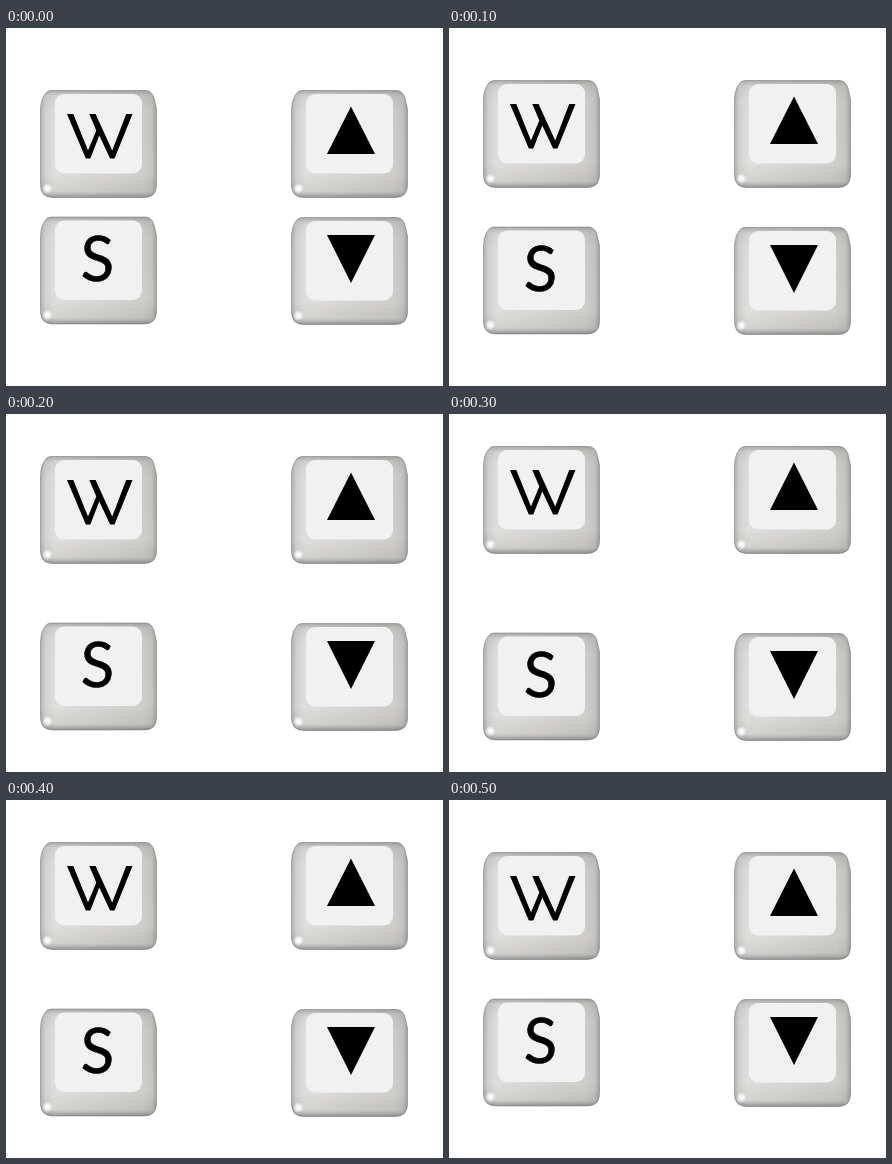
An HTML page without scripts that plays this animation: 437 px wide and 358 px high, repeating every 600 ms.

```html
<!DOCTYPE html>
<html lang="en">
<head>
<meta charset="utf-8">
<title>Arrow keys</title>
<style>
html, body { margin: 0; width: 100%; height: 100%; overflow: hidden; background: #fff; }
svg { display: block; width: 437px; height: 358px; }
.up { --step: -10px; }
.down { --step: 10px; }
.up, .down { animation: slide 600ms step-end infinite; }
@keyframes slide {
  0%, 100% { transform: translateY(0); }
  16.667%, 83.333% { transform: translateY(var(--step)); }
  33.333%, 66.667% { transform: translateY(calc(var(--step) * 2)); }
  50% { transform: translateY(calc(var(--step) * 3)); }
}
text { font: 61.5px Lato, sans-serif; text-anchor: middle; stroke: #000; stroke-width: .6px; }
</style>
</head>
<body>
<svg viewBox="0 0 437 358">
  <defs>
    <linearGradient id="side">
      <stop offset="0" stop-color="#aaa9a7"/>
      <stop offset=".04" stop-color="#cccbc9"/>
      <stop offset=".12" stop-color="#dbdad8"/>
      <stop offset=".5" stop-color="#d2d1cf"/>
      <stop offset=".88" stop-color="#c8c7c4"/>
      <stop offset=".96" stop-color="#bdbcb9"/>
      <stop offset="1" stop-color="#999896"/>
    </linearGradient>
    <linearGradient id="shade" x2="0" y2="1">
      <stop offset="0" stop-color="#777" stop-opacity=".5"/>
      <stop offset=".05" stop-color="#888" stop-opacity=".12"/>
      <stop offset=".2" stop-color="#fff" stop-opacity=".08"/>
      <stop offset=".78" stop-color="#fff" stop-opacity=".12"/>
      <stop offset=".94" stop-color="#888" stop-opacity=".1"/>
      <stop offset="1" stop-color="#555" stop-opacity=".55"/>
    </linearGradient>
    <radialGradient id="glint">
      <stop offset="0" stop-color="#fff"/>
      <stop offset=".4" stop-color="#fff" stop-opacity=".8"/>
      <stop offset="1" stop-color="#fff" stop-opacity="0"/>
    </radialGradient>
    <path id="body" d="M11 .5H106Q112 1 114 8L116.5 19V95Q116.5 107.5 104 107.5H13Q.5 107.5 .5 95V19Q1 9 5 4Q7 .5 11 .5Z"/>
    <g id="key">
      <use href="#body" fill="url(#side)"/>
      <use href="#body" fill="url(#shade)" stroke="#777" stroke-opacity=".65" stroke-width=".8"/>
      <circle cx="7.5" cy="98.5" r="5.5" fill="url(#glint)"/>
      <rect x="15" y="4" width="87" height="79.5" rx="9" fill="#f1f1f1"/>
    </g>
  </defs>
  <g class="up">
    <g transform="translate(34 62)">
      <use href="#key"/>
      <path role="img" aria-label="W" d="M27 24h6.3L48 60.5 56.3 40.5 49.3 24h6.3L72.2 60.5 86.2 24h6.3L74.5 68.5h-4.4L59.3 45.5 50.3 68.5h-4.5Z"/>
    </g>
    <g transform="translate(285 62)">
      <use href="#key"/>
      <path d="M60 16.5L84 64H36Z"/>
    </g>
  </g>
  <g class="down">
    <g transform="translate(34 188.5)">
      <use href="#key"/>
      <text x="57.5" y="64.5">S</text>
    </g>
    <g transform="translate(285 189)">
      <use href="#key"/>
      <path d="M36 18H84L60 66Z"/>
    </g>
  </g>
</svg>
</body>
</html>
```
